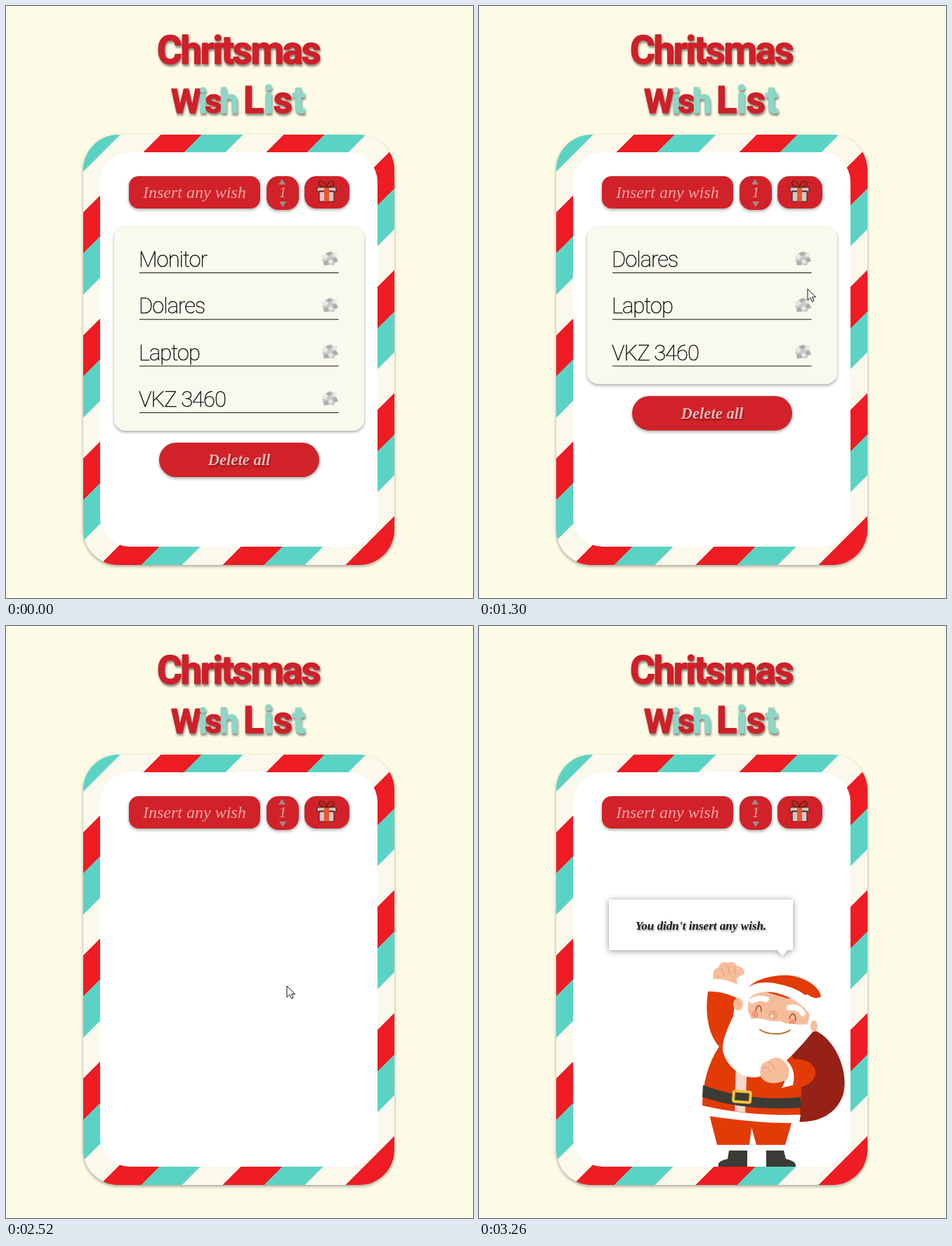
Animation of 665x842 px, one loop 3760 ms. Source, as an HTML page:

```html
<!DOCTYPE html>
<html lang="en">
<head>
<meta charset="utf-8">
<title>Wish List</title>
<style>
  html, body { margin: 0; width: 100%; height: 100%; overflow: hidden; background: #fdfae5; }
  svg { display: block; width: 100%; height: 100%; }
  .title { font: bold 55px Roboto, sans-serif; letter-spacing: -2.5px; fill: #ce2029; stroke: #ce2029; stroke-width: 1.4;
           stroke-linejoin: round; filter: drop-shadow(1px 3px 1.5px rgba(0,0,0,.45)); }
  .title .mint { fill: #8dd6c8; stroke: #8dd6c8; }
  .title .wish { font-size: 49px; letter-spacing: -4px; }
  .title .list { font-size: 54px; letter-spacing: -.5px; }
  .script { font: italic 24px "Liberation Serif", serif; fill: #f2a5a8; }
  .bold { font-weight: bold; filter: drop-shadow(1px 2px 1px rgba(0,0,0,.4)); }
  .count { font-size: 21px; }
  .wipe { font-size: 22.7px; fill: #eeb6b7; }
  .notice { font-size: 17.1px; fill: #1c1c1c; }
  .item { font: 200 31px Roboto, sans-serif; letter-spacing: -1px; stroke: #000; stroke-width: .4; }
  .red { fill: #d12229; }
  .lift { filter: drop-shadow(0 2px 2px rgba(0,0,0,.35)); }
  .glow { filter: drop-shadow(0 1px 5px rgba(0,0,0,.42)); }
  .skin { fill: #f6bd9b; }
  .suit { fill: #e33b06; }
  .dark { fill: #3d3b35; }
  .white { fill: #fff; }
  .line { fill: none; stroke: #9a5a35; stroke-width: 1.6; stroke-linecap: round; }
  .fold { fill: none; stroke: #dc9672; stroke-width: 1; stroke-linecap: round; }
  .smile { stroke: #bd6a22; stroke-width: 2; }
</style>
</head>
<body>
<svg viewBox="0 0 665 842">
  <defs>
    <linearGradient id="stripes" gradientUnits="userSpaceOnUse" spreadMethod="repeat" x1="201.75" y1="201.75" x2="289.3" y2="289.3">
      <stop offset="0" stop-color="#ef1c23"/><stop offset=".3333" stop-color="#ef1c23"/>
      <stop offset=".3333" stop-color="#5bd3c4"/><stop offset=".6667" stop-color="#5bd3c4"/>
      <stop offset=".6667" stop-color="#fbf8ec"/><stop offset="1" stop-color="#fbf8ec"/>
    </linearGradient>
    <clipPath id="page"><rect x="134" y="208" width="395" height="561" rx="42"/></clipPath>
    <clipPath id="sheet"><rect x="154" y="314" width="356" height="290" rx="16"/></clipPath>
    <g id="paper">
      <path fill="#cacaca" d="M-11-3-6-7 1-10 6-8 10-8 9-2 12 4 8 6 6 10-1 9-8 10-9 5-11 3-9 0Z"/>
      <path fill="#adadad" d="M-6-7 1-10 3-6-2-3ZM9-2 3 1 6 5 12 4ZM-8 10-9 5-3 3-1 9Z"/>
      <path fill="#e8e8e8" d="M-11-3-6-7-2-3-6 2ZM6-8 10-8 9-2 3-3ZM-2 4 3 1 5 6 0 8Z"/>
    </g>
  </defs>

  <rect width="665" height="842" fill="#fdfae5"/>
  <g class="title">
    <text x="215" y="82">Chritsmas</text>
    <text class="wish" x="235" y="152">W<tspan class="mint">i</tspan>s<tspan class="mint">h</tspan></text>
    <text class="list" x="338" y="152">L<tspan class="mint">i</tspan>s<tspan class="mint">t</tspan></text>
  </g>

  <rect class="lift" x="110" y="183" width="443" height="612" rx="50" fill="url(#stripes)"/>
  <rect class="white" x="134" y="208" width="395" height="561" rx="42"/>

  <g class="lift red">
    <rect x="175" y="242" width="187" height="46" rx="14"/>
    <rect x="371" y="242" width="46" height="48" rx="17"/>
    <rect x="425" y="242" width="64" height="46" rx="17"/>
  </g>
  <text class="script" x="195" y="273">Insert any wish</text>
  <text class="script count" x="394" y="272" text-anchor="middle">1</text>
  <path fill="#9b8b8b" d="M388 254 393 246 398 254ZM389 278 399 278 394 286Z"/>
  <g stroke="#53201c" stroke-width="1.2" stroke-linejoin="round">
    <path fill="#d9c6c8" d="M446 263H467V278H446ZM443 258H470V264H443Z"/>
    <path fill="#e9572f" stroke="none" d="M453 258H460V278H453Z"/>
    <path fill="#c4281d" d="M456 258C443 257 444 248 449 249S455 253 456 258C458 252 461 248 465 250S469 257 456 258Z"/>
  </g>

  <g id="list">
    <rect id="panel" class="lift" x="154" y="314" width="356" height="290" rx="16" fill="#faf9ee"/>
    <g id="rows" clip-path="url(#sheet)"></g>
    <g id="wipe">
      <rect class="lift red" x="218" y="621" width="228" height="49" rx="24.5"/>
      <text class="script bold wipe" x="332" y="653" text-anchor="middle">Delete all</text>
    </g>
  </g>

  <g clip-path="url(#page)">
    <g id="bubble">
      <path class="white glow" d="M185 389H447V461H440L432 469 424 461H185Z"/>
      <text class="script bold notice" x="316" y="432" text-anchor="middle">You didn't insert any wish.</text>
    </g>
    <g id="santa">
      <path fill="#962116" d="M424 614C438 594 458 579 480 576 512 592 527 640 518 668 508 696 480 707 454 705Z"/>
      <path class="suit" d="M328 694C332 712 336 725 339 738H385L388 713 395 738H436L447 700Z"/>
      <path class="dark" d="M341 769C339 763 345 760 354 758L356 746H382V769ZM409 769V746H434L437 758C446 760 452 763 451 769Z"/>
      <path class="suit" d="M327 515C321 545 325 580 342 598 326 622 318 652 318 684 360 694 410 699 457 699L460 640 440 600 372 592C359 572 360 548 368 528Z"/>
      <path fill="#fbd6cf" d="M366 622H382L379 692 364 690Z"/>
      <path class="dark" d="M319 653C360 669 410 675 458 670V685C410 689 360 684 318 670Z"/>
      <rect x="362.5" y="662" width="24" height="15" rx="2" fill="#3d3b35" stroke="#f3c141" stroke-width="4" transform="rotate(4 374 669)"/>
      <path class="white" d="M318 682C360 692 410 697 458 695L456 707C410 708 360 702 315 695Z"/>
      <path class="skin" d="M335 506C331 494 335 486 341 486 343 478 350 477 354 479 361 476 366 480 368 484 374 484 378 488 378 494L367 501 368 516Z"/>
      <path class="fold" d="M345 487 349 497M354 483 357 495M364 486 365 496"/>
      <path class="white" d="M329 503C345 499 365 507 380 516L374 533C357 523 340 519 324 520Z"/>
      <path class="white" d="M376 524C368 548 346 578 347 604 354 632 382 648 402 640 432 630 456 600 478 574Z"/>
      <ellipse class="skin" cx="369" cy="538" rx="7" ry="9"/>
      <ellipse class="skin" cx="477" cy="569" rx="5" ry="8"/>
      <path class="fold" d="M366 536Q370 533 371 541"/>
      <path class="skin" d="M383 548C382 527 392 515 410 515L467 536C472 550 471 559 467 567 454 573 440 568 430 562 418 563 401 559 388 559Z"/>
      <g fill="#f08a70" opacity=".75"><circle cx="393" cy="552" r="5"/><circle cx="446" cy="564" r="5"/></g>
      <path class="line" d="M394 547Q396 539 399 540T402 548M442 558Q445 550 448 552T451 561"/>
      <ellipse cx="419" cy="553" rx="7" ry="6.5" fill="#efaa86"/>
      <circle class="white" cx="417" cy="555" r="2"/>
      <path d="M389 533Q398 527 409 531M442 543Q455 540 461 551" fill="none" stroke="#fff" stroke-width="8" stroke-linecap="round"/>
      <path class="white" d="M386 560C402 555 414 562 424 566 440 563 455 569 470 566L455 590 395 590Z"/>
      <path class="line smile" d="M400 574C411 582 432 582 443 575"/>
      <path class="suit" d="M384 513C398 500 428 494 449 498 470 503 485 515 487 527 481 531 475 529 468 524L440 530Z"/>
      <path class="white" d="M372 531C377 511 397 503 425 509 453 514 476 528 479 546L473 555C462 538 444 527 424 522 402 518 388 522 380 536Z"/>
      <path class="suit" d="M440 617C462 612 480 622 479 637 477 650 462 658 440 658Z"/>
      <path class="white" d="M437 617C447 625 451 638 447 653L431 657C438 646 438 632 428 620Z"/>
      <path class="skin" d="M401 640C399 628 403 619 412 619 418 612 429 613 433 618 443 625 444 637 438 645 426 653 405 652 401 640Z"/>
      <path class="fold" d="M404 629Q411 625 415 634M412 620Q420 623 421 631"/>
    </g>
  </g>

  <g id="cursor" fill="#fff" stroke="#111" stroke-linejoin="round">
    <path id="arrow" d="M0 0V16L4 12.5 6.5 18 9 17 6.5 11.5H11.5Z"/>
    <path id="hand" d="M-2 2A2 2 0 0 1 2 2V8Q5 6.5 6 9 9 8 9.5 11 11 12 10 16L8 21H-1Q-3 17-6 13-5 10-2 13ZM2 8V12M6 9V12"/>
  </g>
</svg>
<script>
const LOOP = 3760, ROW = 66.3, SLIDE = 200;
const $ = id => document.getElementById(id);
const move = (el, x, y) => el.setAttribute('transform', `translate(${x} ${y})`);
const show = (el, on) => { el.style.display = on ? '' : 'none'; };

// label and the moment its removal starts
const rows = [['Monitor', 840], ['Dolares', 2320], ['Laptop', 2320], ['VKZ 3460', 1720]].map(([label, out]) => {
  const el = document.createElementNS('http://www.w3.org/2000/svg', 'g');
  el.innerHTML = `<text class="item" x="189" y="371">${label}</text>
    <path stroke="#111" d="M190 379.5H473.5"/><use href="#paper" x="461" y="359"/>`;
  $('rows').append(el);
  return { el, out };
});

// pointer: time, x, y
const path = [
  [100, 668, 28], [180, 630, 46], [260, 560, 72], [340, 512, 112], [430, 489, 190], [520, 482, 290], [620, 471, 356],
  [1040, 471, 356], [1300, 468, 402], [1360, 467, 428], [1580, 463, 495], [2060, 462, 495], [2320, 400, 512],
  [2620, 400, 512], [2760, 404, 496], [2900, 422, 436], [3000, 478, 360], [3060, 531, 305], [3140, 620, 191], [3260, 668, 100]
];

function pointerAt(t) {
  const i = path.findIndex(p => p[0] > t);
  if (i < 1) return null;
  const [a, b] = [path[i - 1], path[i]], k = (t - a[0]) / (b[0] - a[0]);
  return [a[1] + (b[1] - a[1]) * k, a[2] + (b[2] - a[2]) * k];
}

// cubic-bezier(.25, .1, .25, 1)
function ease(x) {
  if (x <= 0) return 0;
  if (x >= 1) return 1;
  const curve = (a, b, u) => 3 * a * u * (1 - u) ** 2 + 3 * b * u * u * (1 - u) + u ** 3;
  let lo = 0, hi = 1;
  for (let i = 0; i < 20; i++) {
    const mid = (lo + hi) / 2;
    if (curve(.25, .25, mid) < x) lo = mid; else hi = mid;
  }
  return curve(.1, 1, lo);
}

// short pull to the left, then off to the right
function slide(p) {
  if (p <= 0) return 0;
  return p <= .5 ? -25 * Math.sin(Math.PI * p) : -25 + 380 * (2 * p - 1) ** 2;
}

function drawList(t) {
  let n = 0;
  for (const { el, out } of rows) {
    const p = (t - out) / SLIDE;
    show(el, p < 1);
    if (p < 1) move(el, slide(p), ROW * n++);
  }
  $('panel').setAttribute('height', 290 - ROW * (4 - n));
  move($('wipe'), 0, -ROW * (4 - n));
  show($('list'), n > 0);
  return n;
}

function drawPointer(t, n) {
  const at = pointerAt(t);
  show($('cursor'), at);
  if (!at) return;
  const [x, y] = at, top = 621 - ROW * (4 - n);
  const onPaper = x > 448 && x < 474 && rows.slice(0, n).some((_, i) => Math.abs(y - 359 - ROW * i) < 13);
  const onButton = n > 0 && x > 218 && x < 446 && y > top && y < top + 49;
  const over = onPaper || onButton;
  show($('hand'), over);
  show($('arrow'), !over);
  move($('cursor'), x, y);
}

function drawNotice(t) {
  const p = ease((t - 2722) / 524), gap = 330 * (1 - p);
  move($('bubble'), -gap, 0);
  move($('santa'), 0, gap);
  for (const id of ['bubble', 'santa']) {
    show($(id), p > 0);
    $(id).style.opacity = 1 - (1 - p) ** 2;
  }
}

const start = performance.now();
function frame() {
  const t = (performance.now() - start) % LOOP;
  drawPointer(t, drawList(t));
  drawNotice(t);
  requestAnimationFrame(frame);
}
frame();
</script>
</body>
</html>
```
